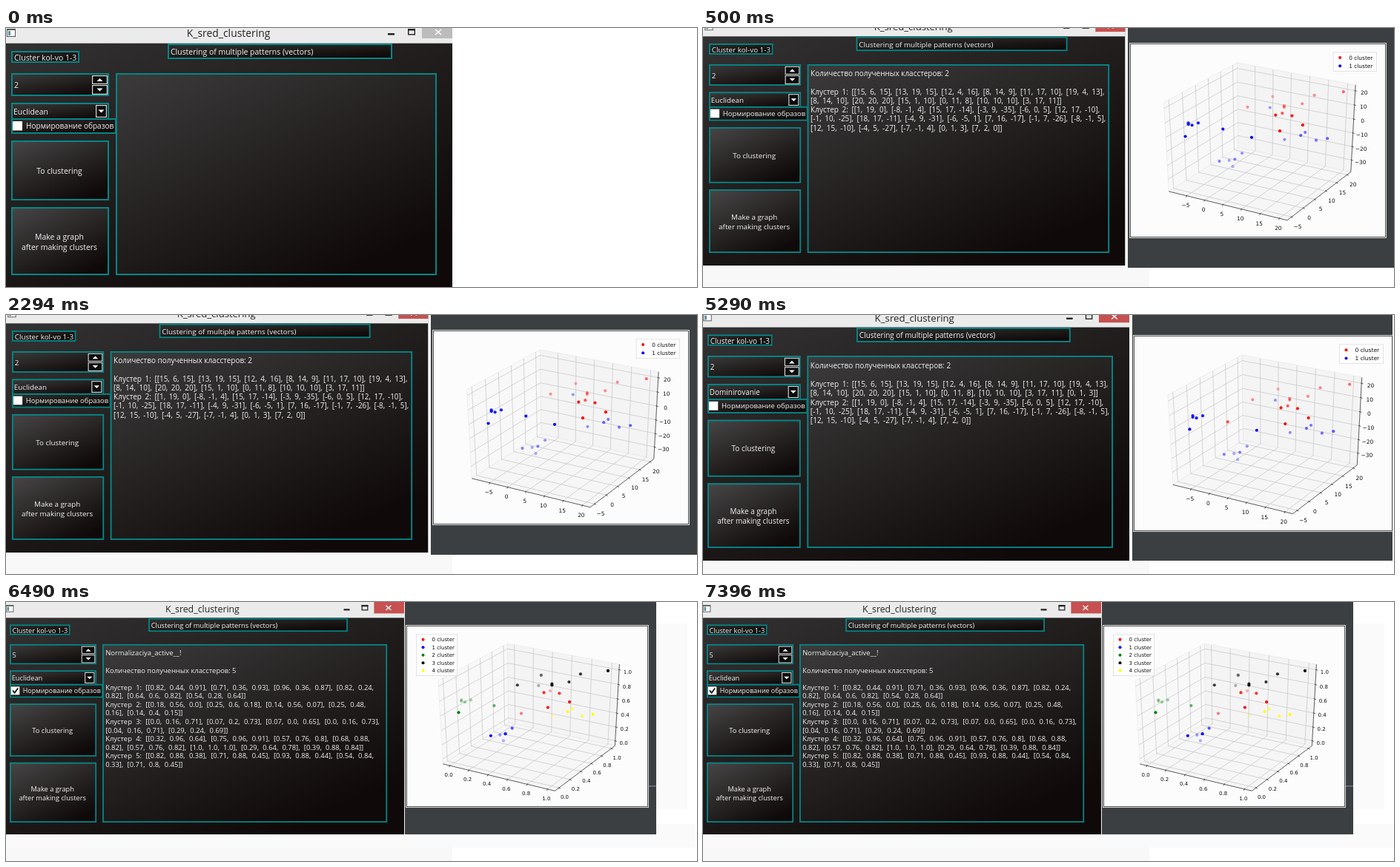
An HTML page with a canvas that plays this animation: 932 by 350 pixels, repeating every 8000 ms.

```html
<!DOCTYPE html>
<html lang="en">
<head>
<meta charset="utf-8">
<title>K_sred_clustering</title>
<style>
html, body { margin: 0; width: 100%; height: 100%; overflow: hidden; background: #fff; }
canvas { display: block; }
</style>
</head>
<body>
<canvas id="stage" width="932" height="350"></canvas>
<script>
const ctx = document.getElementById('stage').getContext('2d');
const LOOP = 8000;
const TEAL = '#078686';
const UI_FONT = '"Open Sans", "Noto Sans", sans-serif';
const PLOT_FONT = '"DejaVu Sans", sans-serif';
const CLUSTER_COLORS = ['#f00', '#00f', '#008000', '#000', '#ff0'];

// The patterns being clustered; every list and plot is computed from them.
const patterns = `1 19 0, 15 6 15, 13 19 15, 12 4 16, 8 14 9, 11 17 10, 19 4 13, 8 14 10,
  20 20 20, 15 1 10, 0 11 8, 10 10 10, 3 17 11, -8 -1 4, 15 17 -14, -3 9 -35, -6 0 5,
  12 17 -10, -1 10 -25, 18 17 -11, -4 9 -31, -6 -5 1, 7 16 -17, -1 7 -26, -8 -1 5,
  12 15 -10, -4 5 -27, -7 -1 4, 0 1 3, 7 2 0`
  .split(',').map(triple => triple.trim().split(' ').map(Number));

const ranges = points => [0, 1, 2].map(a => {
  const values = points.map(p => p[a]);
  return [Math.min(...values), Math.max(...values)];
});
const patternRanges = ranges(patterns);
const normalized = patterns.map(p =>
  p.map((v, a) => (v - patternRanges[a][0]) / (patternRanges[a][1] - patternRanges[a][0])));

const centres = [[0.75, 0.38, 0.83], [0.19, 0.52, 0.11], [0.07, 0.15, 0.7],
  [0.57, 0.86, 0.83], [0.74, 0.86, 0.41]];
const byHeight = ([, , z]) => z >= 8 ? 0 : 1;
const byDomination = ([x, y, z]) => x >= 0 && y >= 0 && z > 0 ? 0 : 1;
const byNearestCentre = p => {
  const distances = centres.map(c => Math.hypot(...c.map((v, a) => v - p[a])));
  return distances.indexOf(Math.min(...distances));
};

function group(points, choose, count) {
  return Array.from({ length: count }, (_, i) => points.filter(p => choose(p) === i));
}

// origin and scale place the dialog layout on the stage; size is its right and bottom edge.
const scenes = [
  { start: 0, origin: [0, 0], scale: [1, 1], size: [602, 350],
    count: 2, metric: 'Euclidean' },
  { start: 500, origin: [1.4, -8], scale: [0.941, 0.934], size: [569.5, 321],
    count: 2, metric: 'Euclidean', clusters: group(patterns, byHeight, 2),
    frame: [573, 0, 932, 324], paper: [576, 21, 921, 283] },
  { start: 3490, origin: [-0.7, -3.1], scale: [0.953, 0.952], size: [575, 332],
    count: 2, metric: 'Dominirovanie', clusters: group(patterns, byDomination, 2),
    frame: [579, 0, 930, 332], paper: [581, 28, 930, 292] },
  { start: 6490, origin: [-1.2, 3.1], scale: [0.887, 0.883], size: [537, 314],
    count: 5, metric: 'Euclidean', clusters: group(normalized, byNearestCentre, 5),
    frame: [538, 0, 877, 314], paper: [540, 32, 866, 277], normalized: true }
];

function fillBox([l, t, r, b], color) {
  ctx.fillStyle = color;
  ctx.fillRect(l, t, r - l, b - t);
}

function strokeBox([l, t, r, b], color, width = 1) {
  ctx.strokeStyle = color;
  ctx.lineWidth = width;
  ctx.strokeRect(l + width / 2, t + width / 2, r - l - width, b - t - width);
}

const grow = ([l, t, r, b], d) => [l - d, t - d, r + d, b + d];

function polyline(points, color, width) {
  ctx.beginPath();
  points.forEach(([x, y]) => ctx.lineTo(x, y));
  ctx.strokeStyle = color;
  ctx.lineWidth = width;
  ctx.stroke();
}

function polygon(points, color) {
  ctx.beginPath();
  points.forEach(([x, y]) => ctx.lineTo(x, y));
  ctx.fillStyle = color;
  ctx.fill();
}

function dot(x, y, r, color) {
  ctx.beginPath();
  ctx.arc(x, y, r, 0, Math.PI * 2);
  ctx.fillStyle = color;
  ctx.fill();
}

function label(text, x, y, size, color, font = UI_FONT, align = 'left') {
  ctx.font = `${size}px ${font}`;
  ctx.textAlign = align;
  ctx.fillStyle = color;
  ctx.fillText(text, x, y);
}

const uiText = (text, x, y, align) => label(text, x, y, 10.45, '#f2f2f2', UI_FONT, align);

// The gradient follows the proportions of its box.
function shadedBox([l, t, r, b], light) {
  ctx.save();
  ctx.translate(l, t);
  ctx.scale(r - l, b - t);
  const gradient = ctx.createLinearGradient(0, 0, 0.7, 1);
  gradient.addColorStop(0, light);
  gradient.addColorStop(1, '#0f0909');
  fillBox([0, 0, 1, 1], gradient);
  ctx.restore();
}

function panel(box, light = '#3c3b3b') {
  shadedBox(box, light);
  strokeBox(box, TEAL, 2);
}

const columnPanel = (top, bottom, light) => panel([7, top, 139, bottom], light);

function arrowButton(box, direction) {
  fillBox(box, '#0c0c0c');
  strokeBox(box, '#d8d8d8', 1.2);
  const x = (box[0] + box[2]) / 2, y = (box[1] + box[3]) / 2, h = 2 * direction;
  polygon([[x - 4, y - h], [x + 4, y - h], [x, y + h]], '#fff');
}

function drawTitleBar(active) {
  fillBox([-4, -6, 620, 20.7], '#ebebeb');
  fillBox([1, 1, 13, 12], '#555');
  fillBox([2, 3, 12, 11], '#fff');
  fillBox([3, 4, 6, 10], '#5f8fa8');
  label('K_sred_clustering', 300, 12.2, 13.9, '#222', UI_FONT, 'center');
  fillBox([515, 7, 524, 9.5], '#222');
  strokeBox([542, 1, 552, 9.5], '#222', 1.4);
  fillBox([542, 1, 552, 3.5], '#222');
  fillBox([561, -6, 620, 14], active ? '#c75050' : '#bcbcbc');
  polyline([[579, 2], [587, 9]], '#fff', 1.5);
  polyline([[587, 2], [579, 9]], '#fff', 1.5);
}

function formatValue(v, decimals) {
  if (!decimals) return String(v);
  const rounded = Math.round(v * 100) / 100;
  return Number.isInteger(rounded) ? rounded.toFixed(1) : String(rounded);
}

function wrap(text, width) {
  const lines = [''];
  for (const word of text.split(' ')) {
    const line = lines.pop();
    const longer = line ? `${line} ${word}` : word;
    if (ctx.measureText(longer).width <= width) lines.push(longer);
    else lines.push(line, word);
  }
  return lines;
}

function drawReport({ clusters, count, normalized }) {
  let y = 78.5;
  const write = line => {
    label(line, 152.7, y, 10.6, '#f2f2f2');
    y += 13.1;
  };
  if (normalized) ['Normalizaciya_active__!', ''].forEach(write);
  [`Количество полученных класстеров: ${count}`, ''].forEach(write);
  ctx.wordSpacing = normalized ? '3.2px' : '2.1px';
  clusters.forEach((cluster, i) => {
    const items = cluster.map(p => `[${p.map(v => formatValue(v, normalized)).join(', ')}]`);
    wrap(`Клустер ${i + 1}: [${items.join(', ')}]`, 428).forEach(write);
  });
  ctx.wordSpacing = '0px';
}

function drawDialog(scene) {
  const body = [0, 0, ...scene.size];
  ctx.save();
  ctx.beginPath();
  ctx.rect(...body);
  ctx.clip();
  shadedBox(body, '#343333');
  ctx.translate(...scene.origin);
  ctx.scale(...scene.scale);
  drawTitleBar(scene.clusters);

  panel([7, 31, 99, 47], '#2c2b2b');
  uiText('Cluster kol-vo 1-3', 11, 44);
  panel([218, 21, 521, 42], '#343333');
  uiText('Clustering of multiple patterns (vectors)', 222, 36);

  columnPanel(61, 92);
  uiText(scene.count, 11, 81);
  arrowButton([116, 64, 137, 76], -1);
  arrowButton([116, 77, 137, 90], 1);

  columnPanel(101, 124);
  uiText(scene.metric, 10, 117);
  arrowButton([121, 104, 136, 121], 1);

  panel([7, 122, 149, 143], '#2f2e2e');
  fillBox([9, 126, 22, 138.5], '#fff');
  if (scene.normalized) polyline([[11.5, 132], [14.5, 135.5], [19.5, 128.5]], '#111', 2);
  label('Нормирование образов', 27, 136, 10.05, '#f2f2f2');

  columnPanel(152, 233, '#474646');
  uiText('To clustering', 72, 197, 'center');
  columnPanel(242, 334, '#474646');
  uiText('Make a graph', 72, 286, 'center');
  uiText('after making clusters', 72, 299.5, 'center');

  panel([148, 61, 581, 334]);
  if (scene.clusters) drawReport(scene);
  ctx.restore();
}

// Perspective view at 30 degrees elevation and -60 degrees azimuth.
const nearness = ([x, y, z]) => 0.433 * x - 0.75 * y + 0.5 * z;

function projector([l, t, r, b]) {
  const w = r - l, h = b - t;
  return p => {
    const [x, y, z] = p;
    const k = 1 / (1 - nearness(p) / 10);
    return [l + 0.513 * w * (1 + k * (0.866 * x + 0.5 * y)),
            t + h * (0.4905 - 0.503 * k * (-0.25 * x + 0.433 * y + 0.866 * z))];
  };
}

function drawAxes(project, limits, normalize, size) {
  const H = 0.521;
  const unit = size / 7.4;
  const pane = (corners, color) => {
    const points = corners.map(project);
    polygon(points, color);
    polyline([...points, points[0]], '#e6e6e6', 0.6);
  };
  pane([[-H, -H, -H], [-H, H, -H], [-H, H, H], [-H, -H, H]], '#f8f8f8');
  pane([[-H, H, -H], [H, H, -H], [H, H, H], [-H, H, H]], '#f4f4f4');
  pane([[-H, -H, -H], [H, -H, -H], [H, H, -H], [-H, H, -H]], '#f6f6f6');

  const axes = [
    { grid: v => [[v, -H, -H], [v, H, -H], [v, H, H]],
      ends: [[-H, -H, -H], [H, -H, -H]], offset: [-1.5, 13], tick: [-1, 2] },
    { grid: v => [[H, v, -H], [-H, v, -H], [-H, v, H]],
      ends: [[H, -H, -H], [H, H, -H]], offset: [8, 13], tick: [2, 1] },
    { grid: v => [[H, H, v], [-H, H, v], [-H, -H, v]],
      ends: [[H, H, -H], [H, H, H]], offset: [12, 2.7], tick: [2.2, 0.8] }
  ];
  const labels = [];
  axes.forEach(({ grid, offset, tick }, a) => {
    const [lo, hi] = limits[a];
    const step = hi - lo < 2 ? 0.2 : hi - lo < 40 ? 5 : 10;
    for (let n = Math.ceil(lo / step); n * step <= hi; n++) {
      const points = grid(normalize(n * step, a)).map(project);
      polyline(points, '#bdbdbd', 0.6);
      labels.push({ at: points[0], offset, tick,
        text: step < 1 ? (n * step).toFixed(1) : String(n * step).replace('-', '−') });
    }
  });
  axes.forEach(({ ends }) => polyline(ends.map(project), '#222', 0.7));
  labels.forEach(({ at: [x, y], offset, tick, text }) => {
    polyline([[x - tick[0] / 2, y - tick[1] / 2], [x + tick[0], y + tick[1]]], '#222', 0.7);
    label(text, x + offset[0] * unit, y + (offset[1] + 2.7) * unit,
      size, '#111', PLOT_FONT, 'center');
  });
}

function drawLegend([l, t, r], count, size) {
  const width = 8 * size, pitch = 1.5 * size;
  const left = count > 2 ? l + 13 : r - 12 - width;
  const top = t + 11.5;
  const box = [left, top, left + width, top + 4 + pitch * count];
  fillBox(box, 'rgba(255,255,255,0.8)');
  strokeBox(box, '#dcdcdc', 0.8);
  for (let i = 0; i < count; i++) {
    const y = top + 2 + pitch * (i + 0.5);
    dot(left + 9.5, y, 2, CLUSTER_COLORS[i]);
    label(`${i} cluster`, left + 21.5, y + 2.5, size, '#111', PLOT_FONT);
  }
}

function drawPlot({ frame, paper, clusters }) {
  const size = 0.0215 * (paper[2] - paper[0]);
  fillBox(frame, '#3c3f41');
  fillBox(grow(paper, 1), '#d8d8d8');
  fillBox(paper, '#555');
  fillBox(grow(paper, -1), '#fcfcfc');

  const limits = ranges(clusters.flat()).map(([lo, hi]) => {
    const pad = (hi - lo) * 0.05;
    return [lo - pad, hi + pad];
  });
  const normalize = (v, a) => (v - limits[a][0]) / (limits[a][1] - limits[a][0]) - 0.5;
  const project = projector(paper);
  drawAxes(project, limits, normalize, size);

  clusters.forEach((cluster, i) => {
    const points = cluster.map(p => p.map(normalize));
    const depths = points.map(nearness);
    const far = Math.min(...depths), near = Math.max(...depths);
    points.forEach((p, j) => {
      ctx.globalAlpha = 0.3 + 0.7 * (depths[j] - far) / (near - far);
      dot(...project(p), 2.1, CLUSTER_COLORS[i]);
    });
    ctx.globalAlpha = 1;
  });
  drawLegend(paper, clusters.length, size);
}

function drawBackdrop({ clusters, normalized, size, frame }) {
  fillBox([0, 0, 932, 350], '#fff');
  if (!clusters) return;
  fillBox([0, 300, 602, 350], '#f8f8f8');
  if (normalized) {
    fillBox([0, 300, 930, 332], '#fafafa');
    fillBox([877, 29, 919, 280], '#fafafa');
  }
  fillBox([size[0], 0, frame[0], size[1]], '#f4f4f4');
}

let shown = null;
function tick(now) {
  const time = now % LOOP;
  const scene = scenes.filter(s => s.start <= time).pop();
  if (scene !== shown) {
    shown = scene;
    drawBackdrop(scene);
    if (scene.clusters) drawPlot(scene);
    if (scene.normalized) fillBox([867, 248, 877, 249.5], '#6b7890');
    drawDialog(scene);
  }
  requestAnimationFrame(tick);
}
tick(0);
</script>
</body>
</html>
```
